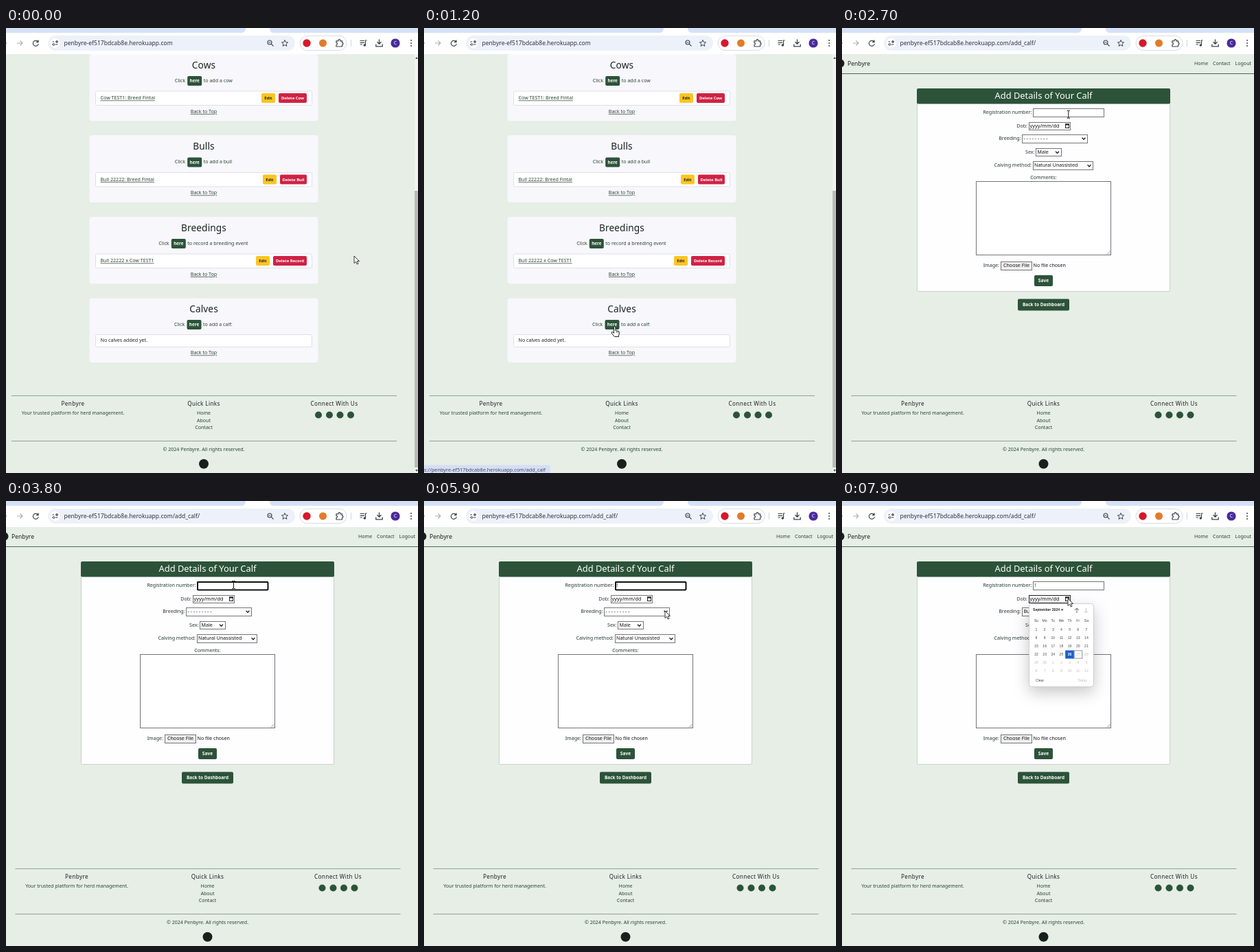
An HTML page for the animation above (8000 ms loop, 600 by 648 pixels).

```html
<!DOCTYPE html>
<html lang="en">
<head>
<meta charset="utf-8">
<title>Add a calf</title>
<style>
html, body { margin: 0; width: 100%; height: 100%; overflow: hidden; background: #e6eee6; }
svg { display: block; width: 600px; height: 648px; }
text { font: 7.1px "Noto Sans", "Open Sans", sans-serif; white-space: pre; }
</style>
</head>
<body>
<svg id="stage" viewBox="0 0 600 648" xmlns="http://www.w3.org/2000/svg"></svg>
<script>
const GREEN = '#2c5339', INK = '#2b4435', DARK = '#1c2420', CHROME = '#3f444b';
const site = 'penbyre-ef517bdcab8e.herokuapp.com';
const stage = document.getElementById('stage');

const rect = (x, y, w, h, fill, extra = '') =>
  `<rect x="${x}" y="${y}" width="${w}" height="${h}" fill="${fill}" ${extra}/>`;
const circle = (x, y, r, fill) => `<circle cx="${x}" cy="${y}" r="${r}" fill="${fill}"/>`;
const path = (d, color = CHROME, width = 1.2, extra = '') =>
  `<path d="${d}" fill="none" stroke="${color}" stroke-width="${width}" ${extra}/>`;
const shape = (d, fill) => `<path d="${d}" fill="${fill}"/>`;
const group = (id, body, extra = '') => `<g id="${id}" ${extra}>${body}</g>`;

// y is the middle of the lower-case letters and capitals
function text(x, y, str, { size = 7.1, fill = INK, anchor = 'start', bold = false, space = 0, line = false, family = '' } = {}) {
  const style = `font-size:${size}px;letter-spacing:${space}px;` + (bold ? 'font-weight:700;' : '') +
    (line ? 'text-decoration:underline;' : '') + (family ? `font-family:${family};` : '');
  return `<text x="${x}" y="${(y + size * 0.35).toFixed(2)}" fill="${fill}" text-anchor="${anchor}" style='${style}'>${str}</text>`;
}
const mid = (x, y, str, opts = {}) => text(x, y, str, { anchor: 'middle', ...opts });
const button = (x1, x2, y, h, label, fill, color = '#fff', size = 5.9) =>
  rect(x1, y - h / 2, x2 - x1, h, fill, 'rx="2"') + mid((x1 + x2) / 2, y, label, { fill: color, bold: true, size });
const box = (x1, x2, y1, y2, fill = '#fff', stroke = '#757575', extra = '') =>
  rect(x1 + .5, y1 + .5, x2 - x1 - 1, y2 - y1 - 1, fill, `stroke="${stroke}" ${extra}`);

function toolbar() {
  let s = rect(0, 0, 600, 38, '#fff') + rect(0, 0, 600, 7, '#d5e1f6') +
    shape('M343 7Q349 7 349 0H384Q384 7 390 7Z', '#fff') +
    rect(61, 11, 360, 22, '#edf1f9', 'rx="11"') +
    rect(428, 11.5, 68, 21, '#fff', 'rx="10.5" stroke="#d5dbe6"');
  s += path('M-3 22H1', '#555b63') + path('M16 22H24M20.5 18.5L24 22L20.5 25.5', '#a9adb3', 1.1);
  s += path('M46.3 19.6A4 4 0 1 0 47.3 23') + shape('M47.6 17V21.2H43.4Z', CHROME);
  s += circle(71.5, 22, 7, '#fff') + path('M67.5 20H70M73 20H75.5M67.5 24H69M72 24H75.5', CHROME, 1.1) +
    `<g fill="none" stroke="${CHROME}" stroke-width="1"><circle cx="74" cy="20" r="1.4"/><circle cx="69.5" cy="24" r="1.4"/></g>`;
  s += `<circle cx="384" cy="21" r="3" fill="none" stroke="${CHROME}" stroke-width="1.1"/>` +
    path('M386.2 23.2L389.5 26.5M382.5 21H385.5', CHROME, 1.1);
  s += path('M406 17.5L407.3 20.6L410.6 20.9L408.1 23.1L408.9 26.4L406 24.6L403.1 26.4L403.9 23.1L401.4 20.9L404.7 20.6Z', CHROME, 1);
  s += circle(438, 22, 5.7, '#d8182c') + circle(461.5, 22, 5.5, '#e27b2a');
  s += path('M481 18.8H484V18A1.4 1.4 0 0 1 486.8 18V18.8H489.5V21.3A1.5 1.5 0 0 1 489.5 24.3V27H481V24.3A1.5 1.5 0 0 0 481 21.3Z', CHROME, 1.2);
  s += path('M502.5 17V27', '#cdd6e6', 1);
  s += path('M515.5 18.5H522M515.5 21.3H522M515.5 24H519M523.5 25V18H525.5') + circle(522.3, 25, 1.8, CHROME);
  s += path('M543.5 16.5V23M540.5 20.3L543.5 23.3L546.5 20.3M538.8 23.5V26.8H548.2V23.5', CHROME, 1.3);
  s += circle(567, 22, 6.6, '#4a2a9c') + mid(567, 22, 'C', { fill: '#fff', size: 7 });
  return s + [18, 22, 26].map(y => circle(590, y, 1, CHROME)).join('');
}

function footer(dx) {
  const head = { size: 8.2, space: .35, fill: DARK };
  let s = path('M8 535.5H569M8 601.5H569', '#94a097', 1);
  s += mid(97.5, 547, 'Penbyre', head) + mid(288, 547, 'Quick Links', head) + mid(478, 547, 'Connect With Us', head);
  s += mid(97.5, 561, 'Your trusted platform for herd management.');
  ['Home', 'About', 'Contact'].forEach((label, i) => s += mid(288, 561 + i * 10.4, label));
  [455, 471, 486.5, 502].forEach(x => s += circle(x, 563.5, 5, GREEN));
  s += mid(288, 613.5, '© 2024 Penbyre. All rights reserved.') + circle(288, 634.8, 7, '#17201b');
  return `<g transform="translate(${dx} 0)">${s}</g>`;
}

function dashCard(top, bottom, mark, title, click, tail, row, edit, del, delLabel) {
  const y = mark, here = click + 18.5;
  let s = rect(121.5, top, 333, bottom - top, '#f8f7fc', 'rx="4"') +
    mid(288, y, title, { size: 13.7, fill: DARK, space: .1 }) +
    text(click, y + 22.5, 'Click') + button(here, here + 21, y + 23, 14, 'here', GREEN, '#fff', 6.3) +
    text(here + 23.5, y + 22.5, tail);
  if (!edit) {
    return s + box(130, 446, y + 37, y + 56, '#fff', '#dfdfe5', 'rx="2"') +
      text(137.5, y + 46, row, { fill: '#222' }) + mid(288, y + 64, 'Back to Top', { line: true });
  }
  return s + box(130, 446, y + 37.5, y + 59, '#fff', '#dfdfe5', 'rx="2"') +
    text(137.5, y + 48, row, { line: true }) +
    button(edit, edit + 20, y + 48, 14, 'Edit', '#fbc523', '#222') +
    button(del, 438, y + 48, 14, delLabel, '#cf2245') +
    mid(288, y + 67.5, 'Back to Top', { line: true });
}

function dashboard() {
  return rect(0, 37, 600, 611, '#e6eee6') +
    dashCard(38, 135.5, 54, 'Cows', 245.7, 'to add a cow', 'Cow TEST1: Breed Fintal', 372, 397, 'Delete Cow') +
    dashCard(156, 254, 172.5, 'Bulls', 245.7, 'to add a bull', 'Bull 22222: Breed Fintal', 374, 399, 'Delete Bull') +
    dashCard(275, 372.5, 291, 'Breedings', 222.3, 'to record a breeding event', 'Bull 22222 x Cow TEST1', 364, 389, 'Delete Record') +
    dashCard(393.5, 487, 409, 'Calves', 245, 'to add a calf:', 'No calves added yet.') +
    footer(0) + rect(595, 38, 5, 610, '#f1f3f1') + rect(595, 237, 5, 403, '#b9bbb9') +
    shape('M596 45L598 42L600 45ZM596 643L598 646L600 643Z', '#555');
}

const label = (x, y, str) => text(x, y, str, { anchor: 'end', fill: '#25392d' });
const chevron = (x, y) => path(`M${x - 2.4} ${y - 1.2}L${x} ${y + 1.4}L${x + 2.4} ${y - 1.2}`, '#111', 1.3);
const field = (x, y, str, opts) => text(x, y, str, { fill: '#111', ...opts });

function calfForm() {
  let s = rect(0, 37, 600, 611, '#e6eee6') + circle(-2.5, 51.5, 6, '#17201b') +
    text(8, 51.5, 'Penbyre', { size: 8.6, fill: DARK }) + text(513, 51.5, 'Home') +
    text(540, 51.5, 'Contact') + text(572.5, 51.5, 'Logout') + path('M0 66.5H600', '#56645b', 1);
  s += box(109, 478, 88, 384, '#fefdff', '#c9d2cb', 'rx="2"') + rect(109, 88, 369, 22.5, GREEN, 'rx="2"') +
    mid(293.5, 98.5, 'Add Details of Your Calf', { size: 12.9, fill: '#fff' });
  s += label(276.3, 123, 'Registration number:') + box(278, 382, 117, 130);
  s += label(270, 142.5, 'Dob:') + box(272, 333, 137, 149) + field(273.5, 142.5, 'yyyy/mm/dd', { size: 7.3 }) +
    box(325, 331, 139.5, 146, '#fff', '#222') + rect(325, 139.5, 6, 2, '#222');
  s += label(260.5, 161, 'Breeding:') + box(262, 358, 155, 168) + chevron(352, 161);
  s += label(280.5, 181, 'Sex:') + box(282, 320, 175, 187) + field(284.5, 181, 'Male') + chevron(313.5, 181);
  s += label(276, 200, 'Calving method:') + box(278, 366, 194, 207) + field(280, 200, 'Natural Unassisted') + chevron(360, 200.5);
  s += mid(293.5, 217.5, 'Comments:', { fill: '#25392d' }) + box(195, 392, 223, 331) +
    path('M386 329.5L390.5 325M389 329.5L390.5 328', '#777', .8);
  s += label(229, 346, 'Image:') + box(231, 277, 340, 353, '#efefef') + mid(254, 346, 'Choose File', { fill: '#111' }) +
    field(278.5, 346, 'No file chosen');
  return s + button(280, 307, 368, 16, 'Save', GREEN, '#fff', 6.6) +
    button(256, 331, 403, 17, 'Back to Dashboard', GREEN, '#fff', 6.5) + footer(5.5);
}

function calendar() {
  const tiny = { size: 5.1, fill: '#444', family: '"Liberation Sans", sans-serif' };
  const grey = { ...tiny, fill: '#bcbcbc' };
  const col = c => 283 + c * 12.15;
  let s = rect(272.5, 149.5, 94, 121, '#fff', 'rx="4" stroke="#c4c4c8" stroke-width=".8"') +
    text(278, 158.5, 'September 2024', { ...tiny, bold: true, fill: '#222' }) + shape('M319 157.6H322.4L320.7 160Z', '#222');
  s += path('M342 163V156.5M339 159L342 156L345 159', '#555', .9) + path('M355.5 156V162.5M352.5 160L355.5 163L358.5 160', '#c4c4c4', .9);
  ['Su', 'Mo', 'Tu', 'We', 'Th', 'Fr', 'Sa'].forEach((d, c) => s += mid(col(c), 174, d, tiny));
  s += rect(325.2, 217.5, 12.6, 12, '#1b5fcc') + rect(338.2, 217.9, 11.6, 11.2, '#fff', 'stroke="#777" stroke-width=".8"');
  for (let i = 0; i < 42; i++) {
    const day = i + 1;
    const look = day === 26 ? { ...tiny, fill: '#fff', bold: true } : day > 26 ? grey : tiny;
    s += mid(col(i % 7), 187 + Math.floor(i / 7) * 12.1, day > 30 ? day - 30 : day, look);
  }
  return s + mid(288, 261, 'Clear', tiny) + mid(350, 261, 'Today', grey);
}

const softShadow = 'style="filter:drop-shadow(0 8px 11px rgba(0,0,0,.22))"';
const suggestions = rect(317, 136, 100.5, 51.5, '#fff', 'rx="4" style="filter:drop-shadow(0 1px 1px rgba(0,0,0,.3))"') +
  text(323.5, 150.5, '!', { bold: true, size: 8, fill: '#8f8010' }) +
  text(323.5, 174, '!!', { bold: true, size: 8, fill: '#8f8010' });
const options = rect(262.5, 168, 95.5, 33, '#fff', 'stroke="#aaa" stroke-width=".6"') +
  field(264.5, 176, '---------', { space: 1.8 }) + rect(263, 184.5, 94.5, 16, '#1967d2') +
  text(264.5, 192, 'Bull 22222 x Cow TEST1', { fill: '#fff', size: 7.2 });

const pointers = {
  arrow: '<path d="M0 0V10.5L2.5 8.3L4.2 12L6 11.2L4.3 7.6H7.6Z" fill="#fff" stroke="#222" stroke-width=".9"/>',
  hand: '<path d="M-1 0Q.3 -1.4 1.4 0V5L5.8 6Q7.3 6.6 7 8.2L6 12.5V14H0L-4.5 8.5Q-4.6 6.8 -3 7.2L-1 8.8Z" fill="#fff" stroke="#222" stroke-width="1"/><path d="M3.2 6V8.3M5.2 6.3V8.5" stroke="#222" stroke-width=".7"/>',
  beam: '<path d="M-2.2 -5.5H-.6L0 -5L.6 -5.5H2.2M0 -5V5M-2.2 5.5H-.6L0 5L.6 5.5H2.2" fill="none" stroke="#111" stroke-width="1"/>'
};

stage.innerHTML = group('dashboard', dashboard()) +
  group('form', calfForm() +
    group('focus', rect(279, 118, 102.5, 11.5, '#fff', 'rx="1.5" stroke="#111" stroke-width="2"')) +
    group('caret', path('M281.5 120V127', '#111', .8)) +
    group('typed', field(280.2, 123, '!')) +
    group('blank', field(264.5, 161, '---------', { space: 1.8 })) +
    group('chosen', field(264.5, 161, 'Bull 22222 x Cow TEST1')) +
    group('suggestions', suggestions) +
    group('sexCover', rect(262, 168, 60, 22, '#fefdff')) +
    group('options', options, softShadow) +
    group('dateFocus', box(272, 333, 137, 149, 'none', '#222')) +
    group('calendar', calendar(), softShadow)) +
  toolbar() +
  text(84.5, 22, site, { size: 8.55, fill: '#2f343b' }).replace('</text>', '<tspan id="route">/add_calf/</tspan></text>') +
  group('status', shape('M0 636.5H181Q184 636.5 184 639.5V648H0Z', '#d5def5') +
    text(0, 643.5, `s://${site}/add_calf`, { size: 7.3, fill: '#444c5a' })) +
  Object.entries(pointers).map(([id, body]) => group(id, body)).join('');

// [time, x, y]
const route = [
  [0, 507, 332], [200, 507, 332], [950, 277.5, 435.5], [2000, 277.5, 435.5], [2600, 329.5, 126.5],
  [3000, 331.5, 122], [5300, 331.5, 122], [5800, 351, 160], [6200, 351, 160], [6600, 339, 188.5],
  [6900, 339, 188.5], [7400, 329, 142], [8000, 329, 142]
];
function pointerAt(t) {
  const i = route.findIndex((p, n) => n && t <= p[0]);
  const [t0, x0, y0] = route[i - 1], [t1, x1, y1] = route[i];
  const u = (t - t0) / (t1 - t0), k = u * u * (3 - 2 * u);
  return [x0 + (x1 - x0) * k, y0 + (y1 - y0) * k];
}

const show = (id, on) => document.getElementById(id).style.display = on ? '' : 'none';
const within = (t, from, to = 8000) => t >= from && t < to;

function draw(t) {
  const onForm = t >= 1500;
  show('dashboard', !onForm);
  show('form', onForm);
  show('route', onForm);
  show('status', within(t, 900, 2200));
  show('focus', within(t, 3200, 6000));
  show('caret', within(t, 3200, 4500) && (t - 3200) % 1000 < 500);
  show('typed', t >= 4500);
  show('suggestions', within(t, 4500, 5400));
  show('sexCover', within(t, 6100, 6900));
  show('options', within(t, 6100, 6900));
  show('blank', t < 6900);
  show('chosen', t >= 6900);
  show('dateFocus', t >= 7500);
  show('calendar', t >= 7500);

  const [x, y] = pointerAt(t);
  const kind = within(t, 900, 2100) ? 'hand' : within(t, 2500, 5500) ? 'beam' : 'arrow';
  for (const id in pointers) show(id, id === kind);
  document.getElementById(kind).setAttribute('transform', `translate(${x} ${y})`);
}

const start = performance.now();
function tick() {
  const t = (performance.now() - start) % 8000;
  draw(Math.floor(t / 100) * 100);
  requestAnimationFrame(tick);
}
tick();
</script>
</body>
</html>
```
